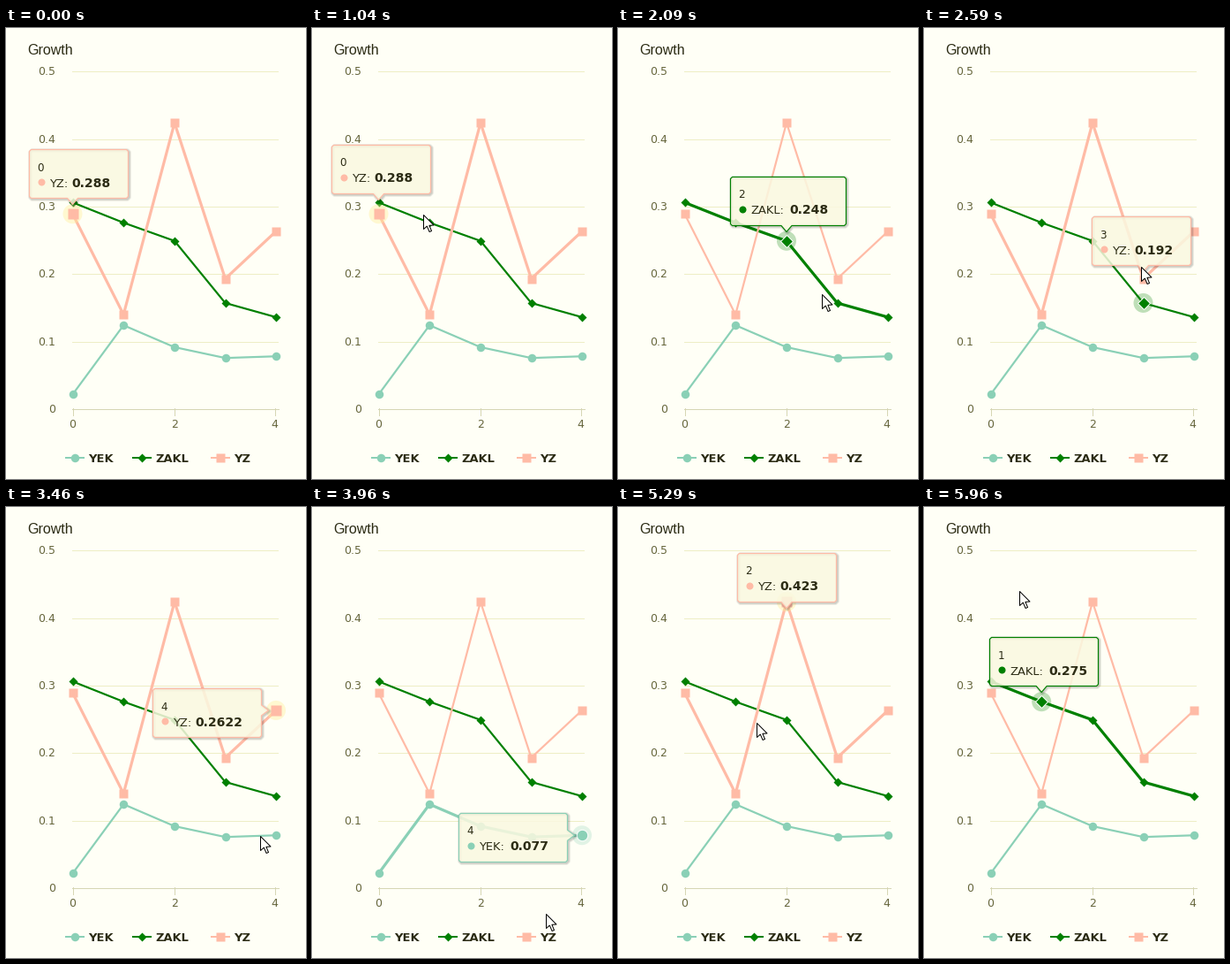
Write a matplotlib script that moves like this. It is 340 px wide and 510 px high and loops after 6000 ms.

```python
import numpy as np
import matplotlib.pyplot as plt
from matplotlib.animation import FuncAnimation
from matplotlib.patches import Circle, Polygon

W, H, DPI = 340, 510, 80
LOOP, STEP = 6000, 40
PX = 72 / DPI  # points per pixel
TAU = 30   # tooltip glide constant, ms
LAG = 80   # marker state trails the tooltip, ms
TIP_H = 55
HIDE, SHOW = 4200, 4600
BG, INK, MUTED, GRID = "#fffff6", "#2b2b14", "#66663c", "#dedf96"

XS = [75.5, 133.2, 191, 248.5, 306]
SERIES = [  # name, colour, marker, marker size, value offset in tooltip, data
    ("YEK", "#8ad0b6", "o", 9.5, 58, [.0205, .123, .0905, .0745, .077]),
    ("ZAKL", "#008000", "D", 6.6, 67, [.305, .275, .248, .156, .135]),
    ("YZ", "#ffbba6", "s", 9.5, 48, [.288, .139, .423, .192, .2622]),
]
# time, series, point, box left, box width
EVENTS = [
    (-900, 2, 0, 26, 112), (965, 1, 0, 16, 131), (1018, 2, 0, 26, 112),
    (1080, 1, 1, 70, 131), (1500, 1, 2, 127, 131), (2170, 1, 3, 182, 131),
    (2491, 2, 3, 191, 112), (2900, 2, 4, 166, 123), (3500, 0, 4, 166, 123),
    (4600, 0, 2, 130, 123), (5200, 2, 2, 135, 112), (5560, 1, 1, 74, 123),
]
PATH = np.array([  # time, x, y of the pointer
    (420, 84, 222), (720, 70, 196), (1040, 126, 211), (1500, 170, 228),
    (2080, 231, 301), (2300, 248, 306), (2560, 246, 270), (2900, 300, 236),
    (3440, 288, 372), (3700, 284, 392), (4160, 250, 512), (4240, 242, 500),
    (4520, 200, 349), (5000, 176, 280), (5500, 142, 215), (5960, 108, 95),
])
ARROW = np.array([(0, 0), (0, 16), (3.8, 12.6), (6.6, 19), (9, 18),
                  (6.4, 11.8), (11.5, 11.5)])

fig = plt.figure(figsize=(W / DPI, H / DPI), dpi=DPI, facecolor=BG)
ax = fig.add_axes([0, 0, 1, 1])
ax.set_xlim(0, W)
ax.set_ylim(H, 0)
ax.axis("off")
live = []


def y_of(v):
    return 430 - 763 * v


def text(x, y, s, size=13, color=INK, font="DejaVu Sans", **kw):
    return ax.text(x, y, s, fontsize=size * PX, color=color, family=font, va="baseline", **kw)


def line(xs, ys, color, width, z, **kw):
    return ax.plot(xs, ys, color=color, lw=width * PX, zorder=z, **kw)[0]


def marker(x, y, s, z, grow=0, edge="none"):
    _, color, shape, size, _, _ = SERIES[s]
    return ax.plot([x], [y], shape, color=color, ms=(size + grow) * PX,
                   mec=edge, mew=PX, zorder=z)[0]


def poly(pts, z, **kw):
    return ax.add_patch(Polygon(pts, closed=True, zorder=z, joinstyle="round", **kw))


def draw_static():
    text(24, 30, "Growth", 16, font="Liberation Sans")
    for k in range(6):
        y = round(y_of(k / 10)) + .5
        text(56, y + 4.2, f"{k / 10:g}", 12.5, MUTED, ha="right")
        if k:
            line([75, 309], [y, y], GRID, 1, 1, ls=(0, (1, 1)), dash_capstyle="butt")
    line([75, 309], [430.5, 430.5], "#d6d6b4", 1, 1)
    for x, s in zip((75.5, 191, 304.5), "024"):
        line([x, x], [430, 438], "#d6d6b4", 1, 1)
        text(x, 452, s, 12.5, MUTED, ha="center")
    for s, x in enumerate((78, 154, 243)):
        line([x - 10, x + 10], [486, 486], SERIES[s][1], 2, 2)
        marker(x, 486, s, 3)
        text(x + 15, 491, SERIES[s][0], 13, weight="bold")


def current(t):
    return [e for e in EVENTS if e[0] <= t][-1]


def target(e):
    _, s, i, left, _ = e
    y = y_of(SERIES[s][5][i])
    return np.array([left, y - 25 if i == 4 else y - 18 - TIP_H])


def glide(t):
    pos = target(EVENTS[0])
    for k, e in enumerate(EVENTS):
        if e[0] > t:
            break
        end = min(t, EVENTS[k + 1][0]) if k + 1 < len(EVENTS) else t
        pos = pos + (target(e) - pos) * (1 - np.exp(-(end - e[0]) / TAU))
    return pos


def outline(x, y, w, px, py, side):
    r, b, c = x + w, y + TIP_H, 2
    pts = [(x + c, y), (r - c, y), (r, y + c)]
    if side:
        m = np.clip(py, y + 8, b - 8)
        pts += [(r, m - 6), (r + 8, m), (r, m + 6)]
    pts += [(r, b - c), (r - c, b)]
    if not side:
        m = np.clip(px, x + 8, r - 8)
        pts += [(m + 6, b), (m, b + 7), (m - 6, b)]
    return np.array(pts + [(x + c, b), (x, b - c), (x, y + c)])


def draw_tip(t):
    fade = 1
    if HIDE <= t < SHOW:
        fade = max(0, 1 - (t - HIDE) / 200)
    if not fade:
        return
    _, s, i, _, w = current(t)
    name, color, _, _, off, data = SERIES[s]
    x, y = np.round(glide(t)) + .5
    shape = outline(x, y, w, XS[i], y_of(data[i]), i == 4)
    for k in (3, 2, 1):
        live.append(poly(shape + 1, 30, fill=False, ec="black", lw=k * 1.6 * PX, alpha=.07 * fade))
    live.append(poly(shape, 31, fc="#faf8e0", ec="none", alpha=.86 * fade))
    live.append(poly(shape, 32, fill=False, ec=color, lw=1.2 * PX, alpha=fade))
    live.append(ax.add_patch(Circle((x + 14, y + 37), 4, fc=color, ec="none",
                                    alpha=fade, zorder=33)))
    for dx, dy, label, size, weight in ((9, 24, str(i), 12, "normal"),
                                        (23, 42, name + ":", 13, "normal"),
                                        (off - .5, 42, f"{data[i]:g}", 14, "bold")):
        live.append(text(x + dx, y + dy, label, size, weight=weight, alpha=fade, zorder=34))


def draw_series(t):
    hot = None if 4000 <= t < SHOW else current(t)[1]
    lit = None if 4000 <= t < SHOW + LAG else current(t - LAG)[1:3]
    for s, (_, color, _, _, _, data) in enumerate(SERIES):
        z = 5 + 5 * s
        ys = [y_of(v) for v in data]
        live.append(line(XS, ys, color, 3.2 if s == hot else 2.2, z, solid_joinstyle="round"))
        for i, (x, y) in enumerate(zip(XS, ys)):
            on = lit == (s, i)
            if on:
                tint, a = ("#ffee99", .4) if s == 2 else (color, .25)
                live.append(ax.add_patch(Circle((x, y), 11, fc=tint, ec="none",
                                                alpha=a, zorder=z + 1)))
            live.append(marker(x, y, s, z + 2, 3 if on else 0,
                               "white" if on and s < 2 else "none"))


def draw_pointer(t):
    if t < PATH[0, 0]:
        return
    tip = [np.interp(t, PATH[:, 0], PATH[:, k]) for k in (1, 2)]
    live.append(poly(ARROW + np.round(tip) + .5, 40, fc="#fffffa", ec="black", lw=PX))


def update(n):
    while live:
        live.pop().remove()
    t = n * STEP
    draw_series(t)
    draw_tip(t)
    draw_pointer(t)
    return live


draw_static()
anim = FuncAnimation(fig, update, frames=LOOP // STEP, interval=STEP,
                     init_func=lambda: [], repeat=True, repeat_delay=0, blit=False)
plt.show()
```
